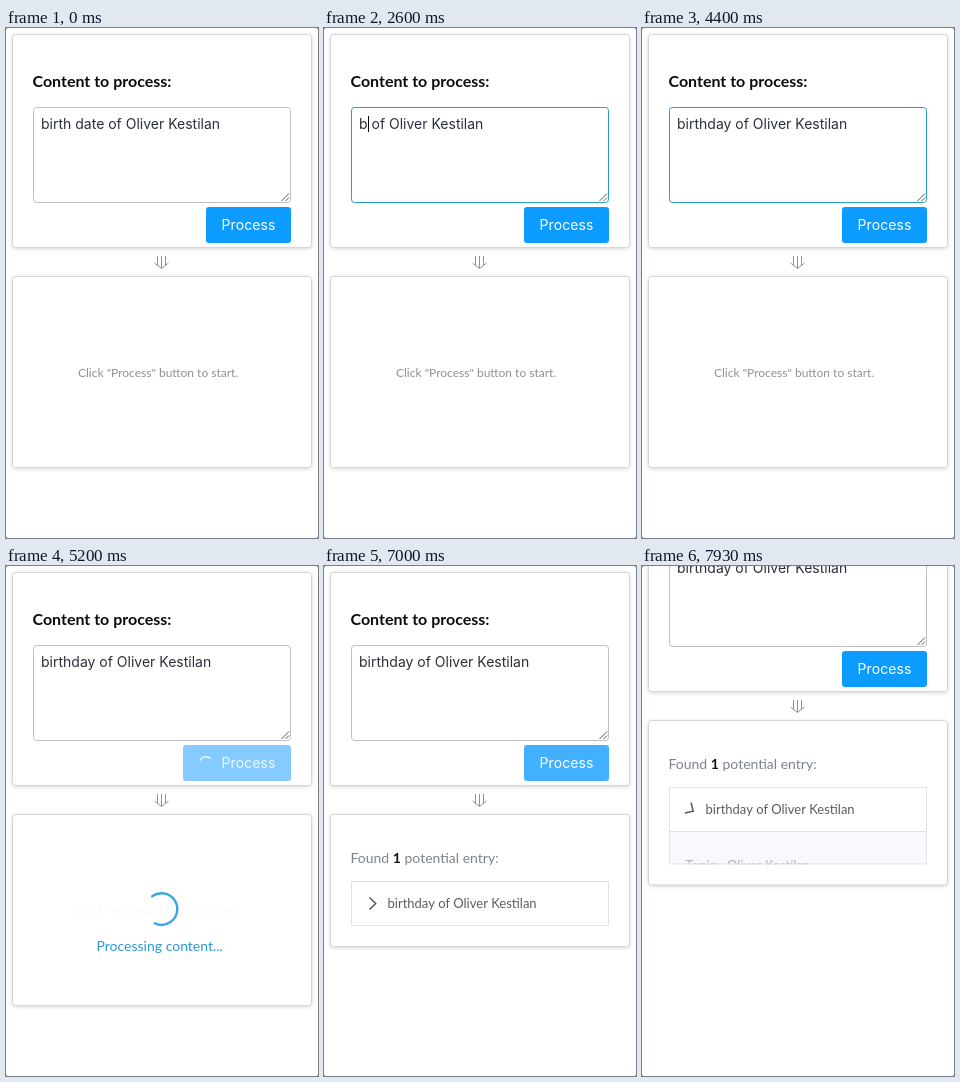
These frames come from a looping animation (312 by 510 pixels, 8000 ms). An HTML page with a canvas:

```html
<!DOCTYPE html>
<html lang="en">
<head>
<meta charset="utf-8">
<title>Content processor</title>
<style>
  html, body { margin: 0; width: 100%; height: 100%; overflow: hidden; background: #fff; }
  canvas { display: block; width: 312px; height: 510px; }
</style>
</head>
<body>
<canvas id="stage"></canvas>
<script>
const W = 312, H = 510, LOOP = 8000;
const canvas = document.getElementById('stage');
const ctx = canvas.getContext('2d');
const dpr = window.devicePixelRatio || 1;
canvas.width = W * dpr;
canvas.height = H * dpr;

const UI = 'Inter, sans-serif';
const ROUND = 'Lato, sans-serif';
const NAME = 'Oliver Kestilan';
const BLUE = [12, 155, 255], BLUE_HOVER = [64, 176, 255], BLUE_OFF = [133, 203, 255];
const EDGE = [190, 191, 197], EDGE_HOVER = [112, 122, 146], EDGE_FOCUS = [35, 160, 208];

// Times of the events in ms
const HOVER = 600, FOCUS = 1230, ERASE = 1740, REPEAT = 2130, TYPE = 2870;
const PRESS = 4870, DONE = 6400, SCROLL = 7000, LEAVE = 7400, OPEN = 7800;

const clamp = v => Math.max(0, Math.min(1, v));
const ramp = (t, start, length) => clamp((t - start) / length);
const smooth = p => p * p * (3 - 2 * p);
const mix = (a, b, p) => a.map((v, i) => v + (b[i] - v) * p);
const rgb = c => `rgb(${c.map(Math.round).join(',')})`;

// Runs through colour changes given as [time, colour], each easing in
function blend(t, first, changes, length = 200) {
  return rgb(changes.reduce((c, [at, next]) => mix(c, next, smooth(ramp(t, at, length))), first));
}

function text(str, x, y, { size = 14, weight = 400, font = UI, color = '#2b2f3a', gap = 0 } = {}) {
  ctx.font = `${weight} ${size}px ${font}`;
  ctx.letterSpacing = gap + 'px';
  ctx.fillStyle = color;
  ctx.fillText(str, x, y);
  return ctx.measureText(str).width;
}

function box(x, y, w, h, r, fill, stroke) {
  ctx.beginPath();
  ctx.roundRect(x, y, w, h, r);
  if (fill) { ctx.fillStyle = fill; ctx.fill(); }
  if (stroke) { ctx.strokeStyle = stroke; ctx.lineWidth = 1; ctx.stroke(); }
}

function lines(color, width, ...paths) {
  ctx.strokeStyle = color;
  ctx.lineWidth = width;
  ctx.beginPath();
  for (const path of paths) {
    path.forEach(([x, y], i) => i ? ctx.lineTo(x, y) : ctx.moveTo(x, y));
  }
  ctx.stroke();
}

function card(y, h) {
  ctx.save();
  ctx.shadowColor = 'rgba(0,0,0,.2)';
  ctx.shadowBlur = 4 * dpr;
  ctx.shadowOffsetY = dpr;
  box(6.5, y, 299, h, 3, '#fff');
  ctx.restore();
  box(6.5, y, 299, h, 3, '#fff', '#d6d6da');
}

// Arc that grows and shrinks while it turns
function spinner(x, y, r, width, color, t, sweep, offset) {
  const p = (t / 1600 % 1 + 1) % 1;
  const length = sweep * (1 - Math.abs(2 * p - 1));
  const swing = p < .5 ? 270 * p : 135 + 630 * (p - .5);
  const start = swing + 270 * p + t * .12 + offset;
  ctx.save();
  ctx.lineCap = 'round';
  ctx.strokeStyle = color;
  ctx.lineWidth = width;
  ctx.beginPath();
  ctx.arc(x, y, r, start * Math.PI / 180, (start + length) * Math.PI / 180);
  ctx.stroke();
  ctx.restore();
}

// Text before the caret
function typed(t) {
  if (t < TYPE) {
    const erased = t < ERASE ? 0 : t < REPEAT ? 1 : Math.min(9, 2 + Math.floor((t - REPEAT) / 62));
    return 'birth date'.slice(0, 10 - erased);
  }
  return 'birthday'.slice(0, 2 + Math.floor((t - TYPE) / 170));
}

function caretShown(t) {
  if (t < FOCUS || t >= PRESS) return false;
  if (t >= ERASE && t < 4000) return true;
  const since = t < ERASE ? t - FOCUS : t - 4000 + 150;
  return since % 1000 < 500;
}

function form(t) {
  const busy = t >= PRESS && t < DONE;
  card(6.5, 213);
  text('Content to process:', 26.5, 59, { size: 16, weight: 700, font: ROUND, color: '#0c0c0c' });

  const edge = blend(t, EDGE, [[HOVER, EDGE_HOVER], [FOCUS + 40, EDGE_FOCUS], [PRESS, EDGE]]);
  box(27.5, 79.5, 257, 95, 3, '#fff', edge);
  lines('#555', 1, [[275.5, 173], [283, 165.5]], [[279.5, 173], [283, 169.5]]);
  const before = typed(t), style = { gap: 0 };
  const width = text(before, 35, 101, style);
  text(` of ${NAME}`, 35 + width, 101, style);
  if (caretShown(t)) {
    ctx.fillStyle = '#000';
    ctx.fillRect(Math.round(35 + width), 88, 1, 16);
  }

  const grow = smooth(ramp(t, PRESS, 200)) - smooth(ramp(t, DONE, 200));
  const fill = blend(t, BLUE, [[PRESS - 270, BLUE_HOVER], [PRESS, BLUE_OFF], [DONE, BLUE_HOVER], [LEAVE, BLUE]]);
  box(200 - 23 * grow, 179, 85 + 23 * grow, 36, 3, fill);
  if (busy) {
    ctx.globalAlpha = grow;
    spinner(200, 197, 6.3, 1.5, '#e8f5ff', t - 5500, 283, 50);
    ctx.globalAlpha = 1;
  }
  text('Process', 215.5, 202, { color: busy ? '#eef8ff' : '#fff', gap: .1 });

  lines('#8d939c', 1,
    [[151.5, 228], [151.5, 237]], [[155.5, 228], [155.5, 240]], [[159.5, 228], [159.5, 237]],
    [[148.5, 235], [155.5, 240.5], [162.5, 235]]);
}

function waiting(t) {
  const load = ramp(t, PRESS, 250);
  card(248.5, 191);
  ctx.globalAlpha = 1 - .95 * load;
  text('Click "Process" button to start.', 72, 349, { size: 12, font: ROUND, color: '#8c9299' });
  if (load) {
    ctx.globalAlpha = load;
    spinner(155.5, 343, 15.8, 2.4, '#3aa5e6', t - 5925, 267, 8);
    text('Processing content...', 90.5, 385, { size: 14, font: ROUND, color: '#2a98d2' });
  }
  ctx.globalAlpha = 1;
}

function result(t) {
  const p = ramp(t, OPEN, 300);
  const extra = p ? 115 * p * p * 1.48 : 0;
  const foot = 359.5 + extra;
  card(248.5, 132 + extra);
  const label = { size: 14, font: ROUND, color: '#7d838c' };
  let x = 26.5;
  x += text('Found ', x, 297, label);
  x += text('1', x, 297, { ...label, weight: 700, color: '#111' });
  text(' potential entry:', x, 297, label);

  if (extra) {
    ctx.save();
    ctx.beginPath();
    ctx.rect(27, 360, 258, extra);
    ctx.clip();
    ctx.fillStyle = '#f8f9fd';
    ctx.fillRect(27, 360, 258, extra);
    ctx.globalAlpha = p;
    text('Topic:', 43.5, 398, { size: 13, font: ROUND, color: '#555' });
    text(NAME, 85, 398, { size: 13, font: ROUND, color: '#555' });
    ctx.restore();
    lines('#e2e3e8', 1, [[27, 359.5], [285, 359.5]]);
  }
  box(27.5, 315.5, 257, foot - 315.5, 0, null, '#e2e3e8');

  ctx.save();
  ctx.translate(48.5, 337.5);
  ctx.rotate(Math.PI / 2 * smooth(ramp(t, OPEN, 330)));
  lines('#555', 1.5, [[-3, -6], [3.2, 0], [-3, 6]]);
  ctx.restore();
  text(`birthday of ${NAME}`, 63.5, 342, { size: 13, font: ROUND, color: '#5a5d63' });
}

function draw(now) {
  const t = now % LOOP;
  ctx.setTransform(dpr, 0, 0, dpr, 0, 0);
  ctx.fillStyle = '#8a8a8a';
  ctx.fillRect(0, 0, W, H);
  box(0, 0, W, H, 2.5, '#fff');
  ctx.translate(0, -Math.round(94 * smooth(ramp(t, SCROLL, 510))));
  form(t);
  if (t < DONE) waiting(t); else result(t);
}

const begin = performance.now();
function tick() {
  draw(performance.now() - begin);
  requestAnimationFrame(tick);
}
tick();
</script>
</body>
</html>
```
